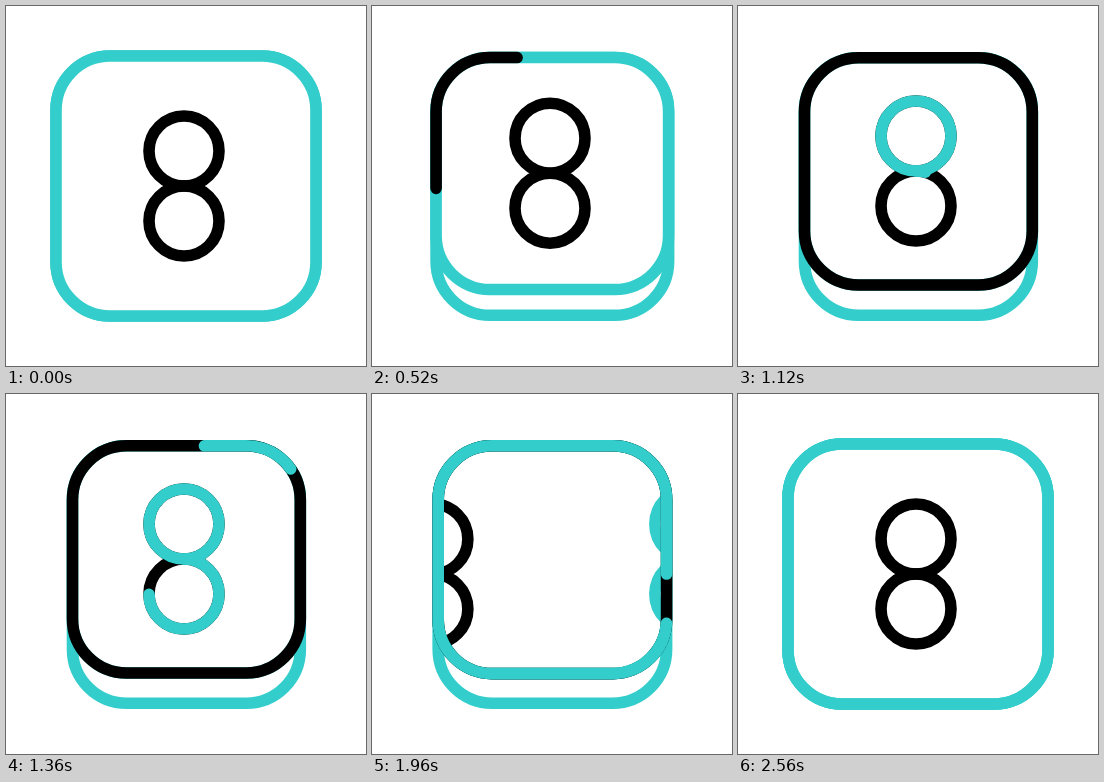
Animation of 360x360 px, one loop 2800 ms. Source, as an HTML page with a canvas:

```html
<!DOCTYPE html>
<html lang="en">
<head>
<meta charset="utf-8">
<title>Key eight</title>
<style>
  html, body { margin: 0; width: 100%; height: 100%; overflow: hidden; background: #fff; }
  canvas { display: block; width: 360px; height: 360px; }
</style>
</head>
<body>
<canvas id="stage"></canvas>
<script>
const LOOP = 2800, STEP = 40, SIZE = 360;
const TEAL = '#33cdcc', BLACK = '#000', LINE = 11.6;
const CORNER = 54, RING = 35, DIGIT_X = 178, SLIDE = 257;

// start and end in ms
const times = {
  rise: [80, 660],
  blackFrame: [290, 1037],
  tealDigit: [652, 1562],
  tealFrame: [1162, 2100],
  slide: [1640, 2475],
  fall: [1925, 2355]
};

const canvas = document.getElementById('stage');
const ctx = canvas.getContext('2d');
const dpr = window.devicePixelRatio || 1;
canvas.width = canvas.height = SIZE * dpr;

const mix = (a, b, p) => a + (b - a) * p;
const smooth = u => u * u * (3 - 2 * u);

function part(t, [from, to]) {
  return Math.min(1, Math.max(0, (t - from) / (to - from)));
}

// cubic bezier (x1, 0, x2, 1)
function bezier(x, x1, x2) {
  let lo = 0, hi = 1;
  for (let i = 0; i < 24; i++) {
    const u = (lo + hi) / 2, v = 1 - u;
    if (3 * v * v * u * x1 + 3 * v * u * u * x2 + u * u * u < x) lo = u;
    else hi = u;
  }
  return smooth(lo);
}

function boxPath(left, top, right, bottom) {
  const r = CORNER;
  ctx.beginPath();
  ctx.moveTo(left + r, top);
  ctx.arcTo(right, top, right, bottom, r);
  ctx.arcTo(right, bottom, left, bottom, r);
  ctx.arcTo(left, bottom, left, top, r);
  ctx.arcTo(left, top, right, top, r);
  ctx.closePath();
}

function stroke(color) {
  ctx.strokeStyle = color;
  ctx.stroke();
}

// Draws a growing piece of the box outline that also travels clockwise.
function traceBox(box, color, p, from, to) {
  if (p <= 0) return;
  const [left, top, right, bottom] = box;
  const total = 2 * (right - left + bottom - top) - (8 - 2 * Math.PI) * CORNER;
  boxPath(...box);
  if (p < 1) {
    const tail = mix(from, to, p);
    ctx.setLineDash([total * p, total * (1 - p)]);
    ctx.lineDashOffset = -tail;
  }
  stroke(color);
  ctx.setLineDash([]);
}

// Upper ring from its bottom, then lower ring from its top, both clockwise.
function eight(x, y, color, p = 1) {
  const ring = (cy, start, amount) => {
    if (amount <= 0) return;
    ctx.beginPath();
    ctx.arc(x, cy, RING, start, start + 2 * Math.PI * Math.min(1, amount));
    stroke(color);
  };
  ring(y, Math.PI / 2, p * 2);
  ring(y + 2 * RING, -Math.PI / 2, p * 2 - 1);
}

function draw(t) {
  const up = smooth(part(t, times.rise)) - smooth(part(t, times.fall));
  const slide = SLIDE * bezier(part(t, times.slide), 0.33, 0.3);
  const left = mix(50, 66.5, up), right = mix(310, 294.3, up);
  const top = mix(50, 51.8, up);
  const box = [left, top, right, mix(310, 279, up)];

  ctx.setTransform(dpr, 0, 0, dpr, 0, 0);
  ctx.fillStyle = '#fff';
  ctx.fillRect(0, 0, SIZE, SIZE);
  ctx.lineWidth = LINE;
  ctx.lineCap = 'round';

  boxPath(left, top, right, mix(310, 309.2, up));
  stroke(TEAL);

  boxPath(...box);
  ctx.fill();
  ctx.save();
  ctx.clip();
  if (slide > 0) {
    eight(DIGIT_X + slide, 130, TEAL);
    eight(DIGIT_X + slide - SLIDE, 145, BLACK);
  } else {
    const y = mix(145, 130, up);
    eight(DIGIT_X, y, BLACK);
    eight(DIGIT_X, y, TEAL, smooth(part(t, times.tealDigit)));
  }
  ctx.restore();

  boxPath(...box);
  stroke(TEAL);
  const tealPart = smooth(part(t, times.tealFrame));
  if (tealPart < 1) {
    traceBox(box, BLACK, smooth(part(t, times.blackFrame)), -193, -56);
  }
  traceBox(box, TEAL, tealPart, 43, 347);
}

const begin = performance.now();
function tick() {
  const t = (performance.now() - begin) % LOOP;
  draw(Math.floor(t / STEP) * STEP);
  requestAnimationFrame(tick);
}
tick();
</script>
</body>
</html>
```
